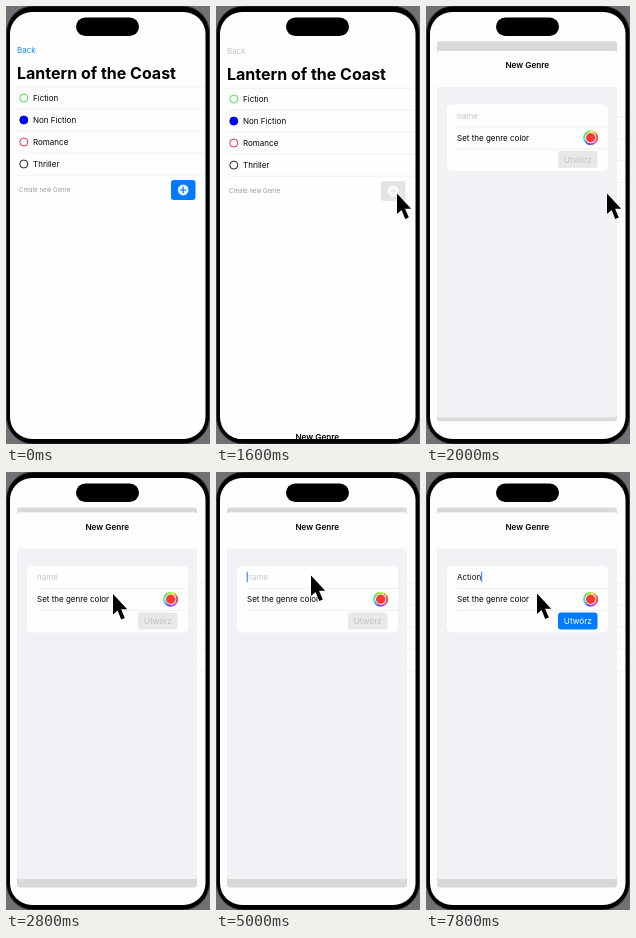
An HTML page that plays this animation: 204 by 438 pixels, repeating every 8 s.

```html
<!DOCTYPE html>
<html lang="en">
<meta charset="utf-8">
<title>New genre sheet</title>
<style>
  html, body { margin: 0; width: 100%; height: 100%; overflow: hidden; background: #6f7173; }
  svg { display: block; width: 204px; height: 438px; font: 8px Inter, "Open Sans", sans-serif; }
  .small { font-size: 6px; fill: #98989c; }
  .title { font-size: 16px; font-weight: 700; }
  .head { font-size: 8.2px; font-weight: 600; text-anchor: middle; }
  .line { stroke: #f0f0f2; stroke-width: 1; }
</style>
<svg viewBox="0 0 204 438">
  <clipPath id="screen"><rect x="4" y="6" width="195.5" height="427" rx="22"/></clipPath>
  <rect x="0.5" y="0" width="203" height="438" rx="27" fill="#000" stroke="#36383a"/>
  <g clip-path="url(#screen)">
    <rect width="204" height="438" fill="#fefefe"/>
    <g id="page">
      <rect id="shade" x="11" y="5.5" width="180" height="380" rx="3" fill="#d9d9dc"/>
      <text id="back" x="11" y="47">Back</text>
      <text class="title" x="11" y="73">Lantern of the Coast</text>
      <g id="rows"></g>
      <text class="small" x="13" y="186.3">Create new Genre</text>
      <g id="add">
        <rect x="165" y="174" width="24.5" height="20" rx="3"/>
        <circle cx="177.2" cy="184" r="5.4" fill="#fff" fill-opacity=".9"/>
        <path d="M174 184h6.4M177.2 180.8v6.4" stroke-width="1.2"/>
      </g>
    </g>
    <g id="sheet">
      <rect x="11" y="40.5" width="180" height="366.5" rx="3" fill="#f2f1f6"/>
      <path d="M11 76.5V43.5q0-3 3-3H188q3 0 3 3V76.5z" fill="#fefefe"/>
      <text class="head" x="101.3" y="57.5">New Genre</text>
      <rect x="21" y="94" width="161" height="66.5" rx="5" fill="#fefefe"/>
      <path class="line" d="M31 116.5H182M31 138.5H182"/>
      <text id="name" x="31" y="108"></text>
      <rect id="caret" y="99.7" width="1" height="10.6" fill="#2a7cf0"/>
      <text x="31" y="130">Set the genre color</text>
      <g id="well"></g>
      <circle cx="164.7" cy="127.2" r="4.7" fill="#fb3b30"/>
      <rect id="save" x="132" y="140.5" width="39.5" height="17" rx="3"/>
      <text id="saveText" x="151.8" y="152" text-anchor="middle" font-size="8.2">Utwórz</text>
    </g>
  </g>
  <rect x="70" y="11.5" width="63" height="18.5" rx="9.25"/>
  <path id="cursor" d="M0 0V20.5L4.6 16.4L8.2 25.4L11.8 23.9L8.1 15.2H14.2Z"
        stroke="#fff" stroke-width="1.2" stroke-linejoin="round" paint-order="stroke"/>
</svg>
<script>
  const $ = id => document.getElementById(id);
  const set = (id, attrs) => {
    for (const key in attrs) $(id).setAttribute(key, attrs[key]);
  };

  const genres = [
    ['Fiction', '#4be34b', 'none'], ['Non Fiction', '#0000f5', '#0000f5'],
    ['Romance', '#d9364c', 'none'], ['Thriller', '#22222e', 'none']
  ];
  $('rows').innerHTML = genres.map(([label, color, fill], i) => {
    const y = 92 + 22 * i;
    return `<path class="line" d="M11 ${y - 11}H199"/>
      <circle cx="17.8" cy="${y}" r="4" fill="${fill}" stroke="${color}"/>
      <text x="27" y="${y + 3}">${label}</text>`;
  }).join('') + '<path class="line" d="M11 169H199"/>';

  // Rainbow ring around the colour well
  $('well').innerHTML = Array.from({ length: 12 }, (_, i) =>
    `<path d="M171.2 127.2A6.5 6.5 0 0 1 168 132.8" fill="none" stroke-width="1.5"
      stroke="hsl(${330 - i * 30} 75% 60%)" transform="rotate(${i * 30} 164.7 127.2)"/>`
  ).join('');

  const path = [
    [0, 230, 330], [200, 206, 300], [1200, 181, 187.5], [2400, 181, 187.5],
    [2800, 107, 122], [3200, 88, 109], [3400, 88, 109], [4000, 80, 108],
    [4600, 95, 103.5], [7000, 95, 103.5], [7200, 96, 105], [7600, 96, 105],
    [7800, 111, 121.5], [8000, 111, 121.5]
  ];
  function pointer(t) {
    const i = path.findIndex(p => p[0] > t);
    const [t0, x0, y0] = path[i - 1], [t1, x1, y1] = path[i];
    const k = (t - t0) / (t1 - t0);
    return [x0 + (x1 - x0) * k, y0 + (y1 - y0) * k];
  }

  function draw(t) {
    const open = t >= 1600;
    const offset = open ? 376 * Math.exp((1600 - t) / 90.4) : 400;
    const rise = open ? 1 - offset / 390 : 0;
    set('sheet', { transform: `translate(0 ${offset})` });
    set('page', { transform: `translate(0 ${30 * rise})` });
    set('shade', { opacity: rise > 0.1 ? rise : 0 });

    const tint = open ? '#e4e4e7' : '#007aff';
    set('back', { fill: open ? '#c2c2c5' : '#1683f0' });
    set('add', { fill: tint, stroke: 'none', opacity: t === 1400 ? 0.4 : 1 });
    $('add').lastElementChild.setAttribute('stroke', tint);

    const count = t < 5400 ? 0 : Math.min(6, 1 + 2 * Math.floor((t - 5400) / 400));
    $('name').textContent = count ? 'Action'.slice(0, count) : 'name';
    set('name', { fill: count ? '#111' : '#c6c6c9' });
    set('caret', {
      x: count ? 31 + $('name').getComputedTextLength() : 30.7,
      opacity: t >= 4600 && t !== 4800 ? 1 : 0
    });
    set('save', { fill: count ? '#007aff' : '#e8e8eb' });
    set('saveText', { fill: count ? '#fff' : '#bfbfc3' });
    set('cursor', { transform: `translate(${pointer(t)})` });
  }

  const STEP = 200, LOOP = 8000;
  const start = performance.now();
  function tick() {
    const t = (performance.now() - start) % LOOP;
    draw(Math.floor(t / STEP) * STEP);
    requestAnimationFrame(tick);
  }
  tick();
</script>
</html>
```
